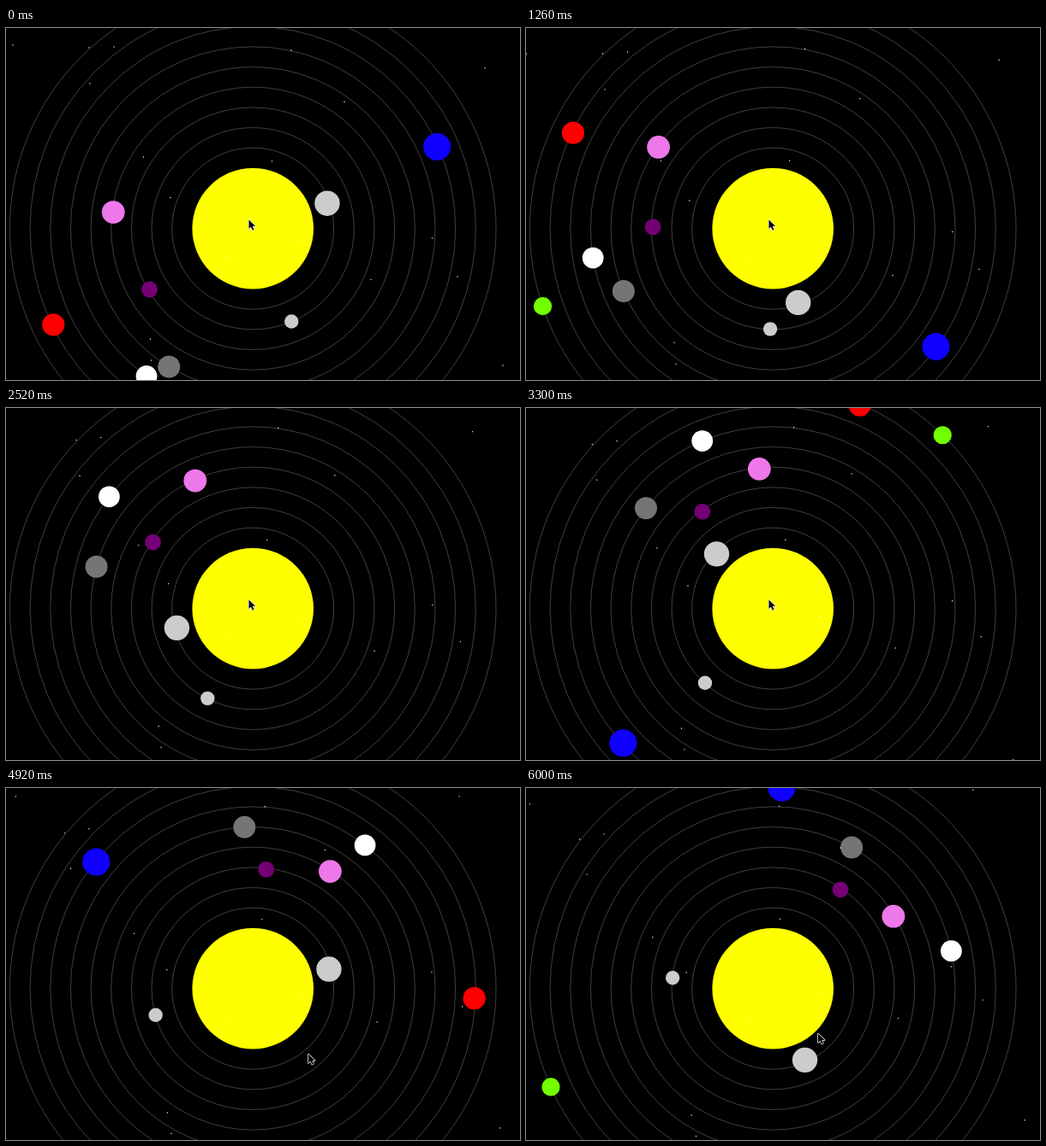
An HTML page with a canvas that plays this animation: 600x412 px, repeating every 6.06 s.

```html
<!DOCTYPE html>
<html lang="en">
<head>
<meta charset="utf-8">
<title>Solar system</title>
<style>
  html, body { margin: 0; width: 100%; height: 100%; overflow: hidden; background: #000; }
  canvas { display: block; }
</style>
</head>
<body>
<canvas id="stage" width="600" height="412"></canvas>
<script>
const ctx = document.getElementById('stage').getContext('2d');
const LOOP = 6060, FRAME = 60;
const CX = 288.2, CY = 234.7, SUN = 70.8, GAP = 23.67;
const STAR_SPEED = -0.1025, STAR_EDGE = 584;
const rad = degrees => degrees * Math.PI / 180;

// Angles in degrees, speeds in degrees per step.
const planets = [
  { color: '#ccc',    orbit: 91.6,  size: 14.7, start: -18.8, speed: 4.5 },
  { color: '#ccc',    orbit: 117.7, size: 8.2,  start: 67.5,  speed: 1.2 },
  { color: '#750075', orbit: 140.1, size: 9.4,  start: 149.4, speed: 1.567 },
  { color: '#ee77ea', orbit: 164.1, size: 13.4, start: 186.7, speed: 1.44 },
  { color: '#757575', orbit: 189.1, size: 13,   start: 121.2, speed: 1.8 },
  { color: '#fff',    orbit: 212.8, size: 12.4, start: 125.7, speed: 2.25 },
  { color: '#0f00ff', orbit: 235.3, size: 16,   start: -24,   speed: 3 },
  { color: '#f00',    orbit: 258.7, size: 13.1, start: 154.2, speed: 2.572 },
  { color: '#72ff00', orbit: 283.6, size: 10.6, start: 71.3,  speed: 4.5 }
];

const stars = [
  [8, 20], [97, 23], [126, 22], [98, 65], [333, 26], [395, 86.5], [559, 47],
  [310.5, 156], [160.5, 151], [192, 198.5], [497.5, 246], [527, 291],
  [426, 294.5], [580, 395], [168.5, 364], [169.5, 389], [342, 250],
  [257, 269], [46.8, -27.7], [550.4, 438]
];

function disc(x, y, radius, color) {
  ctx.beginPath();
  ctx.arc(x, y, radius, 0, 2 * Math.PI);
  ctx.fillStyle = color;
  ctx.fill();
}

function drawRings() {
  ctx.strokeStyle = '#505050';
  ctx.lineWidth = 0.8;
  for (let i = 1; i <= planets.length; i++) {
    ctx.beginPath();
    ctx.arc(CX, CY, SUN + GAP * i, 0, 2 * Math.PI);
    ctx.stroke();
  }
}

function drawStars(step) {
  const turn = rad(STAR_SPEED * step), c = Math.cos(turn), s = Math.sin(turn);
  for (const [x, y] of stars) {
    const dx = x - CX, dy = y - CY;
    const px = CX + dx * c - dy * s, py = CY + dx * s + dy * c;
    if (px < STAR_EDGE) disc(px, py, 0.7, '#fff');
  }
}

function drawPointer(x, y) {
  ctx.save();
  ctx.translate(x, y);
  const arrow = new Path2D('M0 0V10.6L2.5 8.3L4.2 12.2L6 11.4L4.4 7.6H7.6Z');
  ctx.lineJoin = 'round';
  ctx.lineWidth = 1.4;
  ctx.strokeStyle = '#fff';
  ctx.stroke(arrow);
  ctx.fillStyle = '#000';
  ctx.fill(arrow);
  ctx.restore();
}

// The pointer rests on the sun, leaves, then returns lower right.
function placePointer(time) {
  if (time < 3660) return drawPointer(283.5, 224.5);
  if (time < 4560) return;
  const p = Math.min(1, Math.max(0, (time - 4920) / 1080));
  drawPointer(353 - 12 * p, 311.5 - 24 * p);
}

function draw(time) {
  const frame = Math.floor(time / FRAME);
  // One resting frame at the start and a slight lag near the end.
  const step = Math.max(0, frame - 1) - 0.17 * Math.max(0, frame - 82) / 18;

  ctx.fillStyle = '#000';
  ctx.fillRect(0, 0, 600, 412);
  drawRings();
  disc(CX, CY, SUN, '#ff0');
  for (const p of planets) {
    const angle = rad(p.start + p.speed * step);
    disc(CX + p.orbit * Math.cos(angle), CY + p.orbit * Math.sin(angle), p.size, p.color);
  }
  drawStars(step);
  placePointer(frame * FRAME);
}

const began = performance.now();
function tick() {
  draw((performance.now() - began) % LOOP);
  requestAnimationFrame(tick);
}
tick();
</script>
</body>
</html>
```
